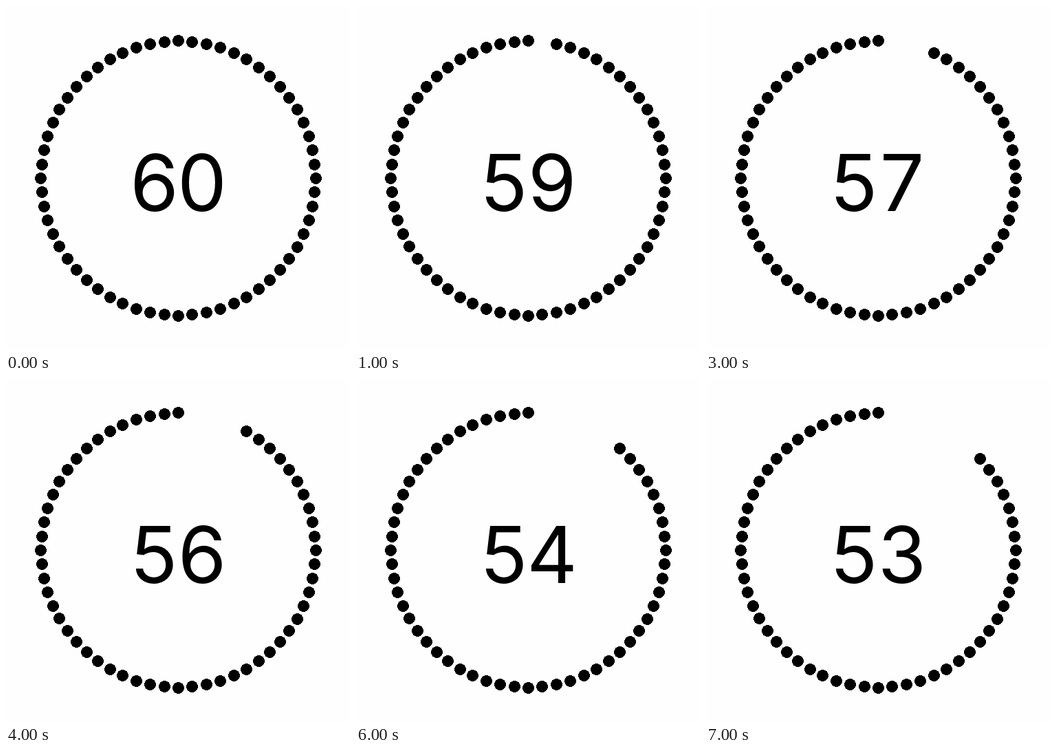
These frames come from a looping animation (500x500 px, 8000 ms). An HTML page:

```html
<!DOCTYPE html>
<html lang="en">
<head>
<meta charset="utf-8">
<title>Countdown</title>
<style>
  html, body { margin: 0; height: 100%; overflow: hidden; background: #fefefe; }
  svg { display: block; width: 500px; height: 500px; }
  circle { shape-rendering: crispEdges; }
  text { font: 114px Inter, "Liberation Sans", sans-serif; text-anchor: middle; }
</style>
</head>
<body>
<svg viewBox="0 0 500 500">
  <g id="ring"></g>
  <text id="count" x="215.5 285" y="297.5">60</text>
</svg>
<script>
  const TOTAL = 60, LOOP = 8000, RADIUS = 200, CENTER = 250;
  const ring = document.getElementById('ring');
  const count = document.getElementById('count');

  // Dots sit on whole pixels, counterclockwise from the top.
  const dots = Array.from({ length: TOTAL }, (_, i) => {
    const angle = i * Math.PI * 2 / TOTAL;
    const dot = document.createElementNS('http://www.w3.org/2000/svg', 'circle');
    dot.setAttribute('cx', CENTER - Math.trunc(RADIUS * Math.sin(angle)) + 0.5);
    dot.setAttribute('cy', CENTER - Math.trunc(RADIUS * Math.cos(angle)) + 0.5);
    dot.setAttribute('r', 8.5);
    return ring.appendChild(dot);
  });

  function draw() {
    const remaining = TOTAL - Math.floor(performance.now() % LOOP / 1000);
    count.textContent = remaining;
    dots.forEach((dot, i) => {
      dot.style.display = i < remaining ? '' : 'none';
    });
    requestAnimationFrame(draw);
  }
  draw();
</script>
</body>
</html>
```
